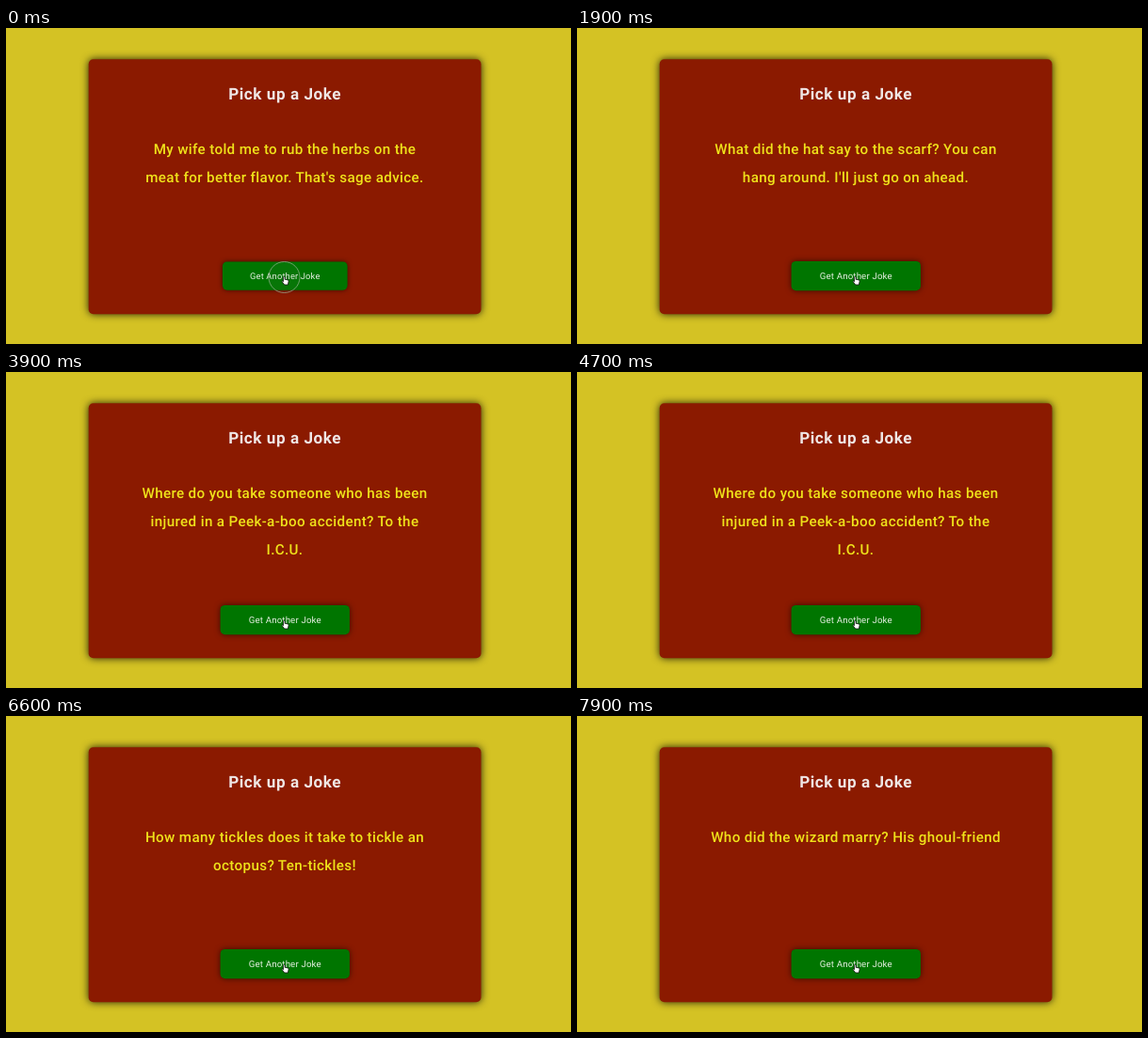
Write an HTML page that moves like this. It is 600 by 336 pixels and loops after 8 s.

```html
<!DOCTYPE html>
<html lang="en">
<head>
<meta charset="utf-8">
<title>Pick up a Joke</title>
<style>
  html, body { margin: 0; width: 100%; height: 100%; overflow: hidden; background: #d4c224; }
  svg { display: block; width: 600px; height: 336px; }
  text { font-family: Roboto, Arial, sans-serif; text-anchor: middle; text-rendering: geometricPrecision; }
  .title { font-size: 17.1px; font-weight: 700; letter-spacing: .55px; fill: #efe6e4; }
  .joke { font-size: 15.2px; font-weight: 500; letter-spacing: .35px; fill: #efe21a; }
  .label { font-size: 9.7px; letter-spacing: .15px; fill: #e4efe0; }
  .card { fill: #8b1a00; filter: drop-shadow(0 0 4px rgba(0, 0, 0, .85)); }
  .face { fill: #007500; filter: drop-shadow(0 0 3px rgba(0, 0, 0, .6)); }
</style>
</head>
<body>
<svg viewBox="0 0 600 336">
  <rect width="600" height="336" fill="#d4c224"/>
  <rect class="card" x="87.7" y="33.3" width="416.8" height="271" rx="5"/>
  <text class="title" x="296.1" y="76.4">Pick up a Joke</text>
  <g id="joke"></g>
  <g id="button">
    <rect class="face" x="227.6" y="247.9" width="137.3" height="31.3" rx="5"/>
    <text class="label" x="296.3" y="266.8">Get Another Joke</text>
  </g>
  <circle id="ring" cx="295.5" cy="265" r="16.5" fill="#808080" fill-opacity=".05"
          stroke="#a9b8a4" stroke-opacity=".65"/>
  <path fill="#fff" stroke="#111" stroke-width=".8" stroke-linejoin="round"
        d="M294.6 264.6q.9-.8 1.6.3v2.4l3.1.6q1 .3.8 1.4l-.7 3.7h-3.7l-2.7-3.5q.3-.9 1.6 0z"/>
</svg>
<script>
const LOOP = 8000;
const jokes = [
  [0, "My wife told me to rub the herbs on the", "meat for better flavor. That's sage advice."],
  [500, "I used to work for an origami company but", "they folded."],
  [1700, "What did the hat say to the scarf? You can", "hang around. I'll just go on ahead."],
  [3200, "Where do you take someone who has been", "injured in a Peek-a-boo accident? To the", "I.C.U."],
  [4900, "My friend told me that pepper is the best", "seasoning for a roast, but I took it with a", "grain of salt."],
  [6400, "How many tickles does it take to tickle an", "octopus? Ten-tickles!"],
  [7600, "Who did the wizard marry? His ghoul-friend"],
];
const clicks = [-130, 1180, 2600, 4350, 5850, 7080];
const [jokeBox, button, ring] = ["joke", "button", "ring"].map(id => document.getElementById(id));
const clamp = v => Math.max(0, Math.min(1, v));
const smooth = v => v * v * (3 - 2 * v);
let shown;

function showJoke(joke) {
  if (joke === shown) return;
  shown = joke;
  jokeBox.innerHTML = joke.slice(1)
    .map((line, i) => `<text class="joke" x="296" y="${133.5 + 30 * i}">${line}</text>`)
    .join("");
}

function draw(now) {
  const t = now % LOOP;
  showJoke(jokes.findLast(([start]) => start <= t));

  const age = t - clicks.findLast(c => c <= t);
  const press = smooth(clamp(age / 110)) * (1 - smooth(clamp((age - 170) / 130)));
  const scale = 1 - .034 * press;
  button.setAttribute("transform",
    `translate(296.2 263.6) scale(${scale}) translate(-296.2 -263.6)`);
  ring.setAttribute("opacity", 1 - clamp((age - 200) / 120));
  requestAnimationFrame(draw);
}
requestAnimationFrame(draw);
</script>
</body>
</html>
```
